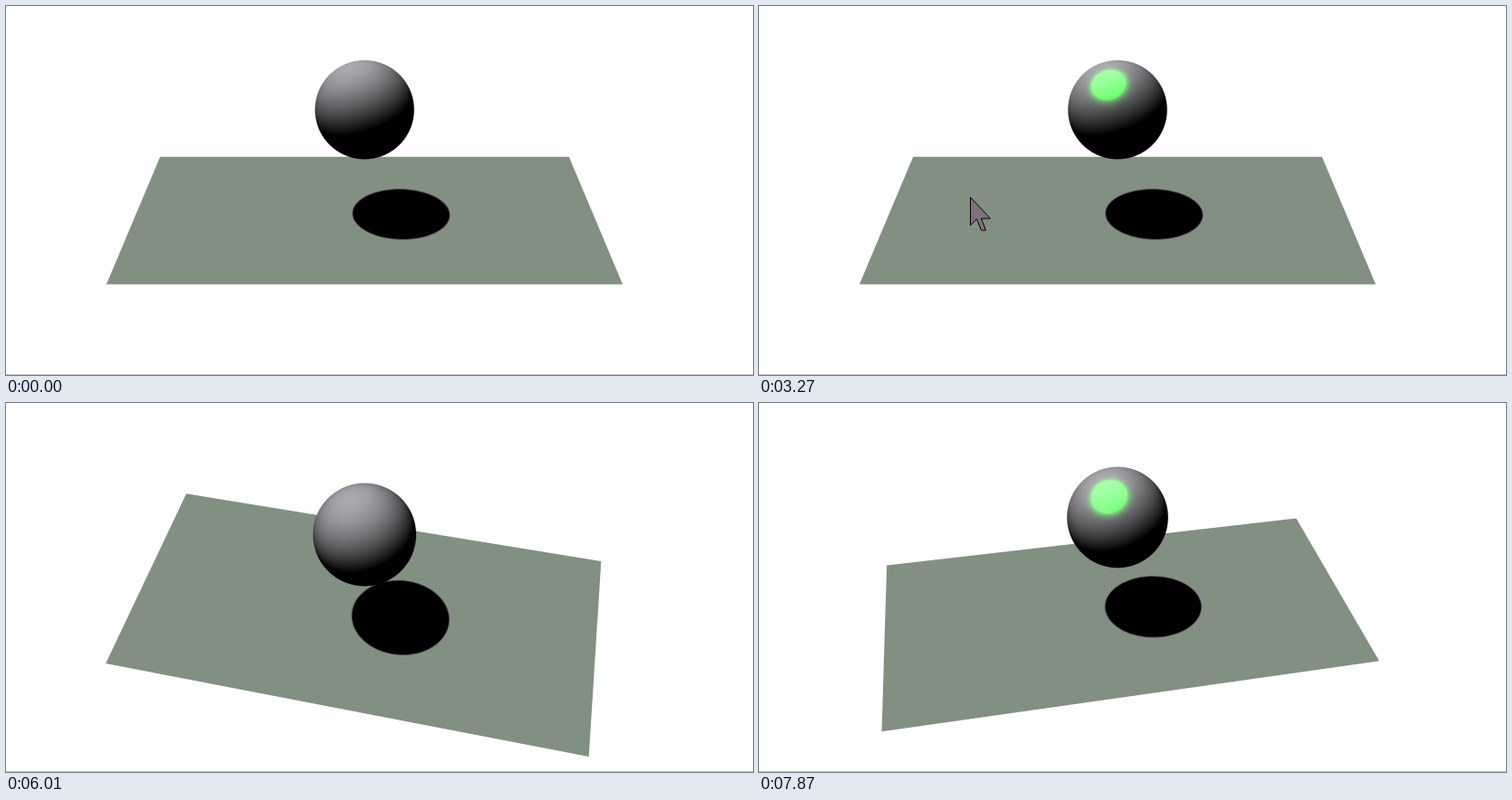
Animation of 825 by 408 pixels, one loop 8000 ms. Source, as an HTML page with a canvas:

```html
<!DOCTYPE html>
<html lang="en">
<head>
<meta charset="utf-8">
<title>Lit sphere</title>
<style>
  html, body { margin: 0; width: 100%; height: 100%; overflow: hidden; background: #fff; }
  canvas { display: block; }
</style>
</head>
<body>
<canvas id="stage" width="825" height="408"></canvas>
<script>
const LOOP = 8000, STEP = 70, OFFSET = 60;    // ms
const CX = 396, CY = 229, DIST = 905;         // view centre, camera distance
const W = 252, D = 126, H = 126.5, R = 50.5;  // plane half sizes, ball height and radius
const LIGHT = [-0.306, 0.952];                // x, y
const RAD = Math.PI / 180;

// camera drag
const ORBIT = [
  { at: 5460, azimuth: 0, pitch: 33.5 },
  { at: 6010, azimuth: 12.3, pitch: 54.2 },
  { at: 6640, azimuth: -1.8, pitch: 55.9 },
  { at: 7180, azimuth: -10.6, pitch: 42.8 }
];

// pointer path
const ENTRY = [83, 382], HOME = [401, 114], SIDE = [289, 235];
const LEFT = [233, 211], LOW = [212, 217], REST = [231, 202];
const MOVES = [
  { from: 130, to: 900, goal: HOME, bend: 220 },
  { from: 1230, to: 1640, goal: SIDE },
  { from: 1710, to: 2090, goal: HOME },
  { from: 2330, to: 3200, goal: LEFT },
  { from: 3280, to: 3500, goal: LOW },
  { from: 3730, to: 3960, goal: REST }
];

const HAND = new Path2D('M5.5 1.5L8.5 .5L10.5 2.5V9.5L13.5 9L15 11L18 11L19 13L21.5 14.5V23L19.5 27V31.5H7.5V28L.5 17V15L3 14L5.5 17Z');
const FINGERS = new Path2D('M10.5 9V16M14.8 11V17M18.5 13V18');
const ARROW = new Path2D('M.5 .5V31.5L7.5 24.5L12.5 37H17.5L12.5 24H22.5Z');

const ctx = document.getElementById('stage').getContext('2d');
const SIZE = 128;
const ballCanvas = document.createElement('canvas');
ballCanvas.width = ballCanvas.height = SIZE;
const ballCtx = ballCanvas.getContext('2d');
const pixels = ballCtx.createImageData(SIZE, SIZE);

const clamp = v => Math.max(0, Math.min(1, v));
const ramp = (t, from, to) => clamp((t - from) / (to - from));
const mix = (a, b, k) => a + (b - a) * k;
const snap = t => Math.floor((t - OFFSET) / STEP) * STEP + OFFSET;

function orbitAt(t) {
  let { azimuth, pitch } = ORBIT[0];
  for (let i = 1; i < ORBIT.length; i++) {
    const k = ramp(t, ORBIT[i - 1].at, ORBIT[i].at);
    azimuth = mix(azimuth, ORBIT[i].azimuth, k);
    pitch = mix(pitch, ORBIT[i].pitch, k);
  }
  return { azimuth, pitch };
}

function pointerAt(t) {
  let [x, y] = ENTRY;
  for (const { from, to, goal, bend = 0 } of MOVES) {
    const k = ramp(t, from, to);
    x = mix(x, goal[0], k) + bend * Math.sin(Math.PI * k);
    y = mix(y, goal[1], k);
  }
  return [x, y];
}

// strength of the green highlight
const glossAt = t => ramp(t, 2800, 3200) - ramp(t, 3730, 4670) + ramp(t, 7570, 7830);

function makeView({ azimuth, pitch }) {
  const sa = Math.sin(azimuth * RAD), ca = Math.cos(azimuth * RAD);
  const sp = Math.sin(pitch * RAD), cp = Math.cos(pitch * RAD);
  const project = (x, y, z) => {
    const rx = x * ca - z * sa, rz = x * sa + z * ca;
    const scale = DIST / (DIST - rz * cp - y * sp);
    return { x: CX + rx * scale, y: CY + (rz * sp - y * cp) * scale, scale };
  };
  return { project, sa, ca, pitch: pitch * RAD };
}

function fillPoly(points, color) {
  ctx.beginPath();
  points.forEach(p => ctx.lineTo(p.x, p.y));
  ctx.closePath();
  ctx.fillStyle = color;
  ctx.fill();
}

function drawPlane({ project }) {
  fillPoly([[-W, -D], [W, -D], [W, D], [-W, D]].map(([x, z]) => project(x, 0, z)), '#829082');
  const rim = [];
  for (let i = 0; i < 72; i++) {
    const a = i * Math.PI / 36;
    rim.push(project(40.3 + 53.3 * Math.cos(a), 0, 49.7 * Math.sin(a)));
  }
  fillPoly(rim, '#000');
  ctx.strokeStyle = 'rgba(45, 25, 45, .55)';
  ctx.lineWidth = 1.5;
  ctx.stroke();
}

function drawBall(view, ball, hover, gloss) {
  const r = R * ball.scale;
  const left = Math.round(ball.x - SIZE / 2), top = Math.round(ball.y - SIZE / 2);

  // light in the frame of the line of sight to the ball
  const tilt = view.pitch - Math.atan((CY - ball.y) / DIST);
  const s = Math.sin(tilt), c = Math.cos(tilt);
  const lx = LIGHT[0] * view.ca, lz = LIGHT[0] * view.sa;
  const ly = LIGHT[1] * c - lz * s, lt = LIGHT[1] * s + lz * c;
  const hl = Math.hypot(lx, ly, lt + 1);
  const shine = 8 + 24 * gloss, power = 4.2 * gloss * gloss * 255;

  const data = pixels.data;
  for (let j = 0, o = 0; j < SIZE; j++) {
    for (let i = 0; i < SIZE; i++, o += 4) {
      let nx = (left + i + 0.5 - ball.x) / r, ny = (ball.y - top - j - 0.5) / r;
      const d = Math.hypot(nx, ny);
      data[o + 3] = 255 * clamp(r - d * r + 0.5);
      if (!data[o + 3]) continue;
      if (d > 1) { nx /= d; ny /= d; }
      const nz = Math.sqrt(Math.max(0, 1 - nx * nx - ny * ny));
      const lit = Math.max(0, nx * lx + ny * ly + nz * lt);
      const half = Math.max(0, (nx * lx + ny * ly + nz * (lt + 1)) / hl);
      const spec = power * lit * Math.pow(half, shine);
      data[o] = 171 * lit + (hover ? 50 : 0);
      data[o + 1] = 169 * lit + spec;
      data[o + 2] = 174 * lit;
    }
  }
  ballCtx.putImageData(pixels, 0, 0);
  ctx.drawImage(ballCanvas, left, top);
}

function drawPointer(x, y, hover, fill) {
  ctx.save();
  ctx.translate(Math.round(x) - (hover ? 7 : 0), Math.round(y));
  ctx.fillStyle = fill;
  ctx.strokeStyle = '#000';
  ctx.lineWidth = 1;
  const shape = hover ? HAND : ARROW;
  ctx.fill(shape);
  ctx.stroke(shape);
  if (hover) ctx.stroke(FINGERS);
  ctx.restore();
}

function draw(time) {
  const t = snap(time);
  const view = makeView(orbitAt(t));
  const ball = view.project(0, H, 0);
  const [px, py] = pointerAt(t);
  const shown = time >= 130 && time < 5370;
  const hover = shown && Math.hypot(px - ball.x, py - ball.y) < R * ball.scale;

  ctx.fillStyle = '#fff';
  ctx.fillRect(0, 0, 825, 408);
  ctx.fillStyle = '#c8c8c8';
  ctx.fillRect(0, 407, 825, 1);
  drawPlane(view);
  drawBall(view, ball, hover, glossAt(t));
  if (shown) drawPointer(px, py, hover, t < 2400 || hover ? '#fff' : '#7f7080');
}

const start = performance.now();
function frame(now) {
  draw(Math.max(0, now - start) % LOOP);
  requestAnimationFrame(frame);
}
draw(0);
requestAnimationFrame(frame);
</script>
</body>
</html>
```
